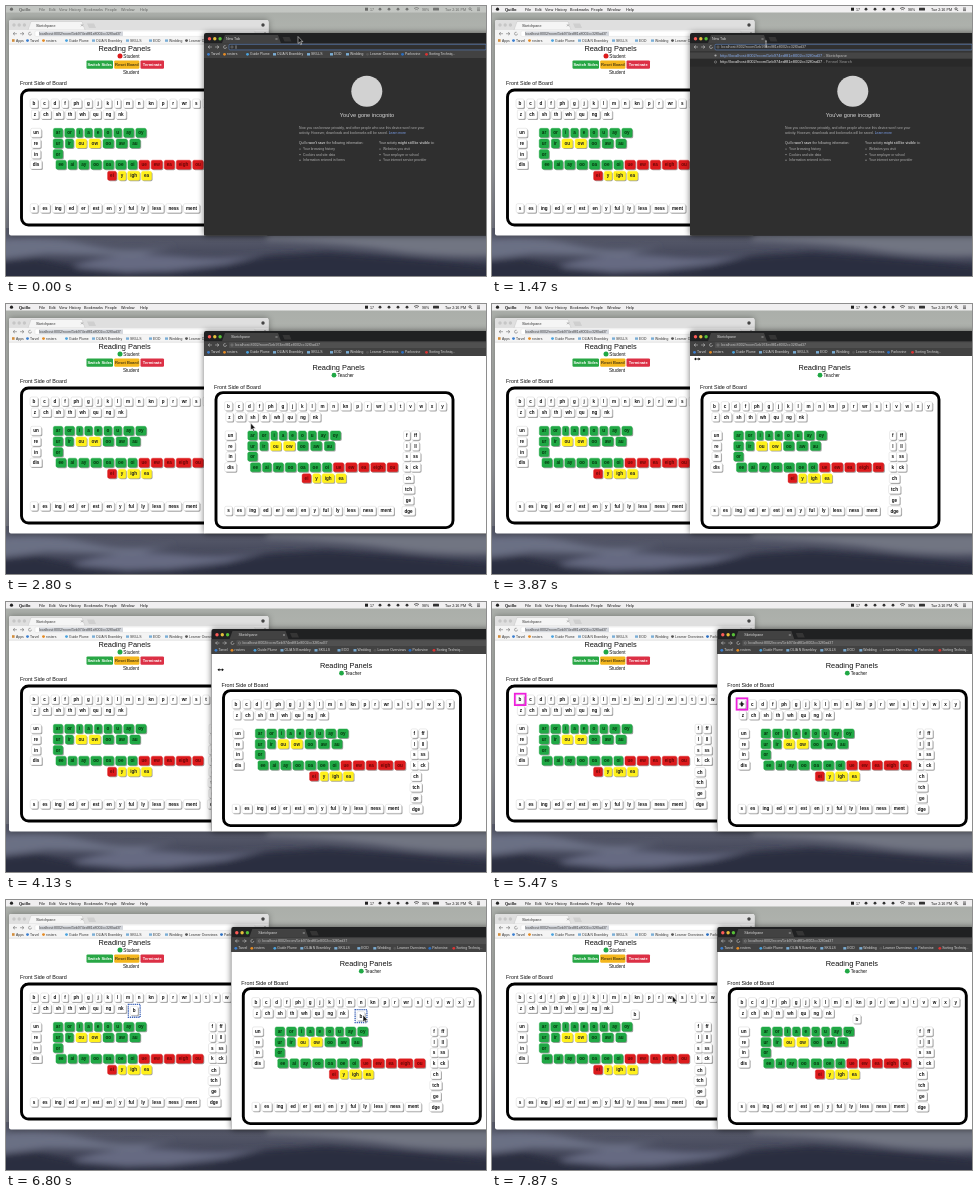
Animation of 480x270 px, one loop 8 s. Source, as an HTML page:

```html
<!DOCTYPE html>
<html lang="en">
<head>
<meta charset="utf-8">
<title>Shared board</title>
<style>
html, body { margin: 0; width: 100%; height: 100%; overflow: hidden; background: #777; }
svg { display: block; width: 100vw; height: 100vh; }
text { font-family: "Liberation Sans", Arial, sans-serif; white-space: pre; }
</style>
</head>
<body>
<svg id="stage" viewBox="0 0 480 270"></svg>
<script>
const LOOP = 8000;
const GREEN = '#20a845', RED = '#dc1a1c', YELLOW = '#fff01a', WHITE = '#fff';
const TITLE = 'Reading Panels', TAB = 'Sketchpane';
const URL_TEXT = 'localhost:8002/room/5eb974edf81e8002cc32f0ad37';
const pen = document.createElement('canvas').getContext('2d');
pen.font = 'bold 100px "Liberation Sans", Arial, sans-serif';
const TILE_FONT = 4.6;
const textWidth = s => pen.measureText(s).width / 100 * TILE_FONT;

// y is the vertical centre of the text
const text = (x, y, s, size, fill = '#111', extra = '') =>
  `<text x="${x}" y="${y + size * 0.35}" font-size="${size}" fill="${fill}" ${extra}>${s}</text>`;
const mid = (x, y, s, size, fill, extra = '') => text(x, y, s, size, fill, 'text-anchor="middle" ' + extra);
const rect = (x, y, w, h, fill, extra = '') =>
  `<rect x="${x}" y="${y}" width="${w}" height="${h}" fill="${fill}" ${extra}/>`;
const dot = (x, y, r, fill, extra = '') => `<circle cx="${x}" cy="${y}" r="${r}" fill="${fill}" ${extra}/>`;
const path = (d, stroke, width = 0.7) =>
  `<path d="${d}" fill="none" stroke="${stroke}" stroke-width="${width}"/>`;
const group = (id, body, extra = '') => `<g id="${id}" ${extra}>${body}</g>`;

function tile(x, y, s, fill = WHITE) {
  const w = textWidth(s) + 5;
  const ink = fill === WHITE ? '#111' : fill === RED ? '#6b0808' : fill === GREEN ? '#06380f' : '#222';
  return rect(x - w / 2 + 1, y - 3.5, w, 9, '#555', 'rx="1.6" opacity=".55"') +
    rect(x - w / 2, y - 4.5, w, 9, fill, `rx="1.5" stroke="${fill === WHITE ? '#ccc' : fill}" stroke-width=".4"`) +
    mid(x, y, s, TILE_FONT, ink, 'font-weight="bold"');
}

// Spreads words between the centres of the first and last tile with equal gaps
function row(words, x0, x1, y, colour = () => WHITE) {
  const list = words.split(' '), widths = list.map(textWidth);
  const last = list.length - 1;
  const used = widths.reduce((a, b) => a + b, 0) - (widths[0] + widths[last]) / 2;
  const gap = last ? (x1 - x0 - used) / last : 0;
  let x = x0;
  return list.map((s, i) => {
    if (i) x += (widths[i - 1] + widths[i]) / 2 + gap;
    return tile(x, y, s, colour(i));
  }).join('');
}

// Tile places are relative to the outer corner of the board
function tiles() {
  const green = () => GREEN;
  let out = row('b c d f ph g j k l m n kn p r wr s t v w x y', 14, 228, 15) +
    row('z ch sh th wh qu ng nk', 15, 101, 26);
  ['un', 're', 'in', 'dis'].forEach((s, i) => out += tile(16, 44.3 + i * 10.6, s));
  out += row('ar or i a e o u ay oy', 38, 121, 44.3, green) +
    row('ur ir ou ow oo aw au', 38, 115, 54.9, i => i === 2 || i === 3 ? YELLOW : GREEN) +
    tile(38, 65.5, 'or', GREEN) +
    row('ee ai ay oo oa oe oi ue ew ea eigh ou', 41, 178, 76.2, i => i < 7 ? GREEN : RED) +
    row('ei y igh ea', 92, 126.5, 87.2, i => i ? YELLOW : RED);
  ['f ff', 'l ll', 's ss', 'k ck'].forEach((pair, i) => {
    const [a, b] = pair.split(' ');
    out += tile(192.3, 44.3 + i * 10.6, a) + tile(201, 44.3 + i * 10.6, b);
  });
  ['ch', 'tch', 'ge', 'dge'].forEach((s, i) => out += tile(194, 87.4 + i * 10.8, s));
  return out + row('s es ing ed er est en y ful ly less ness ment', 14, 171.5, 119.7);
}

const board = (x, y, id) => `<g transform="translate(${x} ${y})">` +
  rect(1.5, 1.5, 237, 135, WHITE, 'rx="7" stroke="#000" stroke-width="2.9"') +
  group(id + 'Tiles', tiles()) +
  group(id + 'Pick', rect(8.8, 9.2, 10.8, 11.4, 'none', 'stroke="#ee20dc" stroke-width="1.8"')) +
  group(id + 'Moved', tile(14, 15, 'b') +
    group(id + 'Dash', rect(8.3, 8.6, 11.8, 12.8, 'none', 'stroke="#3b62b8" stroke-width="1.3" stroke-dasharray="1.3 .8"'))) +
  '</g>';

function bookmarks(x, y, ink) {
  const items = [['Tarvel', 7, '#3c7fd0'], ['rosters', 23, '#e58b24'], ['Guide Plume', 46, '#4aa3df'],
    ['OLIA N Brambley', 73, 0], ['SKILLS', 107, 0], ['EOD', 130, 0], ['Wedding', 146, 0],
    ['Learner Overviews', 166, '#555'], ['Parlorvine', 201, '#2b6fc2'], ['Sorting Techniq...', 225, '#d33']];
  return items.map(([s, dx, c]) =>
    (c ? dot(x + dx - 2.5, y, 1.4, c) : rect(x + dx - 4, y - 1.2, 3, 2.4, '#7baed6')) +
    text(x + dx, y, s, 3.4, ink)).join('');
}

const navIcons = (x, y, c) =>
  path(`M${x + 2} ${y - 1.5}l-2 1.5 2 1.5M${x} ${y}h4M${x + 9} ${y - 1.5}l2 1.5-2 1.5M${x + 11} ${y}h-4`, c, 0.6) +
  `<circle cx="${x + 17}" cy="${y}" r="1.5" fill="none" stroke="${c}" stroke-width=".6" stroke-dasharray="7 2.4"/>`;

function wallpaper() {
  return rect(0, 0, 480, 270, 'url(#sky)') + rect(0, 222, 480, 48, 'url(#slope)') +
    `<g filter="url(#soft)">
     <path d="M260 222H490V250Q430 252 380 244T260 234Z" fill="#717482"/>
     <path d="M-10 234Q40 228 80 238T170 240L130 250 40 248-10 254Z" fill="#6a6f84"/>
     <path d="M60 262Q110 244 170 250T270 246L220 258 140 268Z" fill="#666b82"/>
     <path d="M-10 256L30 252 75 262 120 266 200 264 260 250 320 246 400 252 490 260V280H-10Z" fill="#2b2e40"/>
     </g>`;
}

function menuBar() {
  const items = [['File', 33], ['Edit', 43], ['View', 53], ['History', 63], ['Bookmarks', 78],
    ['People', 99], ['Window', 115], ['Help', 134]];
  return group('menuFill', rect(0, 0, 480, 6.5, '#f0eff0')) + group('editFlash', rect(40.5, 0, 11, 6.5, '#2f6fe4')) +
    group('menuText', dot(5.5, 3.2, 1.6, '#222') + text(13, 3.3, 'Quillo', 4, '#111', 'font-weight="bold"') +
      items.map(([s, x]) => text(x, 3.3, s, 3.8)).join('') +
      '<g transform="translate(-8 0)">' +
      rect(367, 1.7, 3, 3, '#222') + text(372, 3.3, '17', 3.6) +
      [382, 391, 400, 409].map(x => dot(x, 3.2, 1.4, '#333')).join('') +
      path('M416 2.5q2.5-2 5 0M417.3 3.8q1.2-1 2.4 0', '#222') + text(424, 3.3, '98%', 3.5) +
      rect(435, 1.8, 6, 2.8, '#333', 'rx=".5"') + text(447, 3.3, 'Tue 2:16 PM', 3.7) +
      dot(472, 2.8, 1.1, 'none', 'stroke="#222" stroke-width=".6"') + path('M473 3.8l1.2 1.2', '#222') +
      path('M479 2h3M479 3.3h3M479 4.6h3', '#222', 0.6) + '</g>');
}

function leftWindow() {
  const button = (x, w, s, fill, ink) => rect(x, 54.4, w, 8.4, fill, 'rx="1.2"') +
    mid(x + w / 2, 58.7, s, 4, ink, 'font-weight="bold"');
  return rect(3, 14, 259.5, 215.5, '#000', 'rx="2" opacity=".35" filter="url(#shade)"') +
    rect(3, 14, 259.5, 215.5, WHITE, 'rx="2"') +
    '<g clip-path="url(#leftClip)">' + rect(3, 14, 260, 10, '#dfdfdf') +
    [8, 13.2, 18.4].map(x => dot(x, 19, 1.7, '#c6c6c6')).join('') +
    '<path d="M22 24L25 15.5H76L79 24Z" fill="#f5f5f5" stroke="#bbb" stroke-width=".4"/>' +
    text(30, 19.6, TAB, 3.7, '#333') + path('M75 18.3l2 2M77 18.3l-2 2', '#777', 0.5) +
    '<path d="M81 17.5h7l2 4.5h-7Z" fill="#cfcfcf"/>' +
    dot(257, 19, 1.7, '#444') +
    rect(3, 24, 260, 14.2, '#f4f4f4') + navIcons(7, 27.7, '#777') +
    rect(29, 25, 220, 5.4, WHITE, 'rx="1" stroke="#ccc" stroke-width=".3"') +
    rect(33, 25.5, 84, 4.4, '#d3d6dc') + text(33, 27.8, URL_TEXT, 3.55, '#444') +
    path('M259 26v3.4', '#777', 0.8) +
    rect(6, 33.2, 2.6, 2.6, '#d18d3c') + text(10, 34.6, 'Apps', 3.4, '#333') + bookmarks(17, 34.6, '#333') +
    path('M3 38.2h260', '#bbb', 0.4) +
    mid(118.5, 42.3, TITLE, 7.4) +
    dot(114, 50, 2.5, RED, 'id="leftDot"') + text(117.3, 50, 'Student', 4.7) +
    button(80.5, 26.5, 'Switch Sides', '#28a745', WHITE) +
    button(108.2, 25.2, 'Reset Board', '#f4b61d', '#4b3b14') +
    button(134.5, 23.5, 'Terminate', '#dc3045', WHITE) +
    mid(125, 66, 'Student', 4.7) + text(14, 76.8, 'Front Side of Board', 5.4) +
    board(14, 82.5, 'left') + '</g>';
}

function newTabPage() {
  const dim = '#b0b0b0';
  const list = (x, head, lines) => text(x, 137, head, 3.35, '#c4c4c4') +
    lines.map((s, i) => dot(x + 1, 143 + i * 5.6, 0.6, dim) + text(x + 4, 143 + i * 5.6, s, 3.35, dim)).join('');
  return rect(198, 52, 290, 177.5, '#2f2f2f') + dot(360.8, 85.2, 15.5, '#d2d2d2') +
    mid(361, 109.5, 'You\'ve gone incognito', 5.6, '#d8d8d8') +
    text(293, 121.5, 'Now you can browse privately, and other people who use this device won\'t see your', 3.4, dim) +
    text(293, 127, 'activity. However, downloads and bookmarks will be saved. <tspan fill="#7ea2ee">Learn more</tspan>', 3.4, dim) +
    list(293, 'Quillo <tspan font-weight="bold">won\'t save</tspan> the following information:',
      ['Your browsing history', 'Cookies and site data', 'Information entered in forms']) +
    list(373, 'Your activity <tspan font-weight="bold">might still be visible</tspan> to:',
      ['Websites you visit', 'Your employer or school', 'Your internet service provider']);
}

function rightWindow() {
  const full = 'http://' + URL_TEXT;
  return rect(198, 27, 290, 202.5, '#000', 'rx="2" opacity=".55" filter="url(#shade)"') +
    rect(198, 27, 290, 202.5, '#202122', 'rx="2"') +
    [['#fc5b57', 203.5], ['#e5bf3c', 208.8], ['#57c038', 214.1]].map(([c, x]) => dot(x, 32.8, 1.7, c)).join('') +
    '<path d="M216 37.2L219 29H272L275 37.2Z" fill="#424242"/>' +
    group('newName', text(220, 33, 'New Tab', 3.6, '#ddd')) + group('siteName', text(225, 33, TAB, 3.6, '#ddd')) +
    path('M269.5 32l2 2M271.5 32l-2 2', '#aaa', 0.5) +
    '<path d="M276.5 31h7l2 4.5h-7Z" fill="#353535"/>' +
    rect(198, 37.2, 290, 14.8, '#424242') + navIcons(202, 41, '#bbb') +
    rect(223, 38.3, 257, 5.6, '#505050', 'rx="1"') +
    group('focusRing', rect(223, 38.3, 257, 5.6, '#303030', 'rx="1" stroke="#5a83c4" stroke-width=".6"')) +
    dot(226, 41, 1.1, 'none', 'stroke="#999" stroke-width=".5"') +
    group('caret', path('M230 39.4v3.4', '#eee', 0.5)) +
    group('address', text(229, 41.1, URL_TEXT, 3.7, '#c4c4c4')) +
    bookmarks(198, 48.3, '#dadada') +
    newTabPage() +
    group('hints', rect(198, 45.5, 290, 15, '#292929') + rect(198, 46.3, 290, 6.4, '#454545') +
      dot(223.5, 49.5, 1.1, '#aaa') + text(228, 49.5, `<tspan fill="#88aef2">${full}</tspan> - ${TAB}`, 4, '#bbb') +
      dot(223.5, 56, 1.1, 'none', 'stroke="#aaa" stroke-width=".5"') +
      text(228, 56, `${full}<tspan fill="#999"> - Fennel Search</tspan>`, 4, '#f0f0f0')) +
    group('site', rect(198, 52, 290, 177.5, WHITE) + mid(332.5, 63, TITLE, 7.4) +
      group('rightDot', dot(328, 71.2, 2.4, GREEN)) + text(331.5, 71.2, 'Teacher', 4.6) +
      text(208, 82.9, 'Front Side of Board', 5.4) + board(208.5, 87.1, 'right'));
}

const cursor = group('arrow', '<path d="M0 0V7L1.6 5.6 2.7 8.1 3.8 7.6 2.7 5.2H4.9Z" fill="#111" stroke="#fff" stroke-width=".5"/>') +
  group('beam', path('M-1 -3h2M0 -3v6M-1 3h2', '#ddd', 0.6)) +
  group('resize', path('M0 0h4.5', '#111', 0.9) + '<path d="M-1 0l2-1.4v2.8ZM5.5 0l-2-1.4v2.8Z" fill="#111"/>') +
  group('move', path('M-2.4 0h4.8M0 -2.4v4.8', '#111', 1.1));

const stage = document.getElementById('stage');
stage.innerHTML = `<defs>
  <linearGradient id="sky" x1="0" y1="0" x2="0" y2="1">
    <stop offset="0" stop-color="#a9ada8"/><stop offset=".12" stop-color="#b0b3ae"/>
    <stop offset=".6" stop-color="#9b9da0"/><stop offset="1" stop-color="#5c5f70"/>
  </linearGradient>
  <linearGradient id="slope" x1="0" y1="0" x2="0" y2="1">
    <stop offset="0" stop-color="#5f6272"/><stop offset="1" stop-color="#33364a"/>
  </linearGradient>
  <filter id="soft"><feGaussianBlur stdDeviation="3"/></filter>
  <filter id="shade"><feGaussianBlur stdDeviation="3"/></filter>
  <clipPath id="leftClip"><rect x="3" y="14" width="259.5" height="215.5" rx="2"/></clipPath>
  </defs>` + wallpaper() + menuBar() + leftWindow() + group('rightWin', rightWindow()) + group('cursor', cursor);

const el = {};
stage.querySelectorAll('[id]').forEach(n => el[n.id] = n);
const show = (id, on) => el[id].setAttribute('display', on ? 'inline' : 'none');
const place = (id, x, y) => el[id].setAttribute('transform', `translate(${x} ${y})`);

// Linear path through [time, x, y] points
function along(points, t) {
  let a = points[0];
  for (const b of points) {
    if (t < b[0]) {
      const k = Math.max(0, (t - a[0]) / (b[0] - a[0] || 1));
      return [a[1] + (b[1] - a[1]) * k, a[2] + (b[2] - a[2]) * k];
    }
    a = b;
  }
  return [a[1], a[2]];
}
const ease = k => { k = Math.min(1, Math.max(0, k)); return k * k * (3 - 2 * k); };

const POINTER = [[0, 292, 30.5], [70, 292, 30.5], [530, 274, 38], [2330, 274, 38], [2530, 255, 135],
  [2670, 255, 135], [3330, 203, 55], [3900, 203, 55], [4570, 230.3, 92], [5000, 230.3, 92], [5400, 249.8, 102],
  [5930, 249.8, 102], [6800, 357, 115], [7130, 367, 119], [7270, 367, 119], [7870, 180.5, 96]];
const DRAG = [[5930, 0, 0], [6800, 105, 14], [7130, 115, 17]];
const LAG = 42;

function draw(t) {
  const loaded = t >= 1700, filled = t >= 2400, typed = t >= 870;
  el.menuFill.setAttribute('opacity', 0.35 + 0.65 * ease((t - 70) / 460));
  el.menuText.setAttribute('opacity', 0.55 + 0.45 * ease((t - 70) / 460));
  show('editFlash', typed && t < 1000);
  show('newName', !loaded);
  show('siteName', loaded);
  show('focusRing', t < 1600);
  show('caret', !typed);
  show('address', typed);
  show('hints', typed && t < 1600);
  show('site', loaded);
  show('rightDot', filled);
  show('rightTiles', filled);
  el.leftDot.setAttribute('fill', filled ? GREEN : RED);
  place('rightWin', 27.3 * ease((t - 3900) / 670), 0);

  for (const [side, lag] of [['left', LAG], ['right', 0]]) {
    const s = t - lag;
    show(side + 'Pick', s >= 5330 && s < 5930);
    show(side + 'Moved', s >= 5930);
    show(side + 'Dash', s < 7130);
    place(side + 'Moved', ...along(DRAG, s));
  }

  place('cursor', ...along(POINTER, t));
  const kind = t < 500 ? 'arrow' : t < 1600 ? 'beam' : t < 2330 ? '' : t < 3300 ? 'arrow' :
    t < 5000 ? 'resize' : t < 5330 ? 'arrow' : t < 5930 ? 'move' : 'arrow';
  for (const k of ['arrow', 'beam', 'resize', 'move']) show(k, k === kind);
}

const start = performance.now();
function tick() {
  draw((performance.now() - start) % LOOP);
  requestAnimationFrame(tick);
}
draw(0);
requestAnimationFrame(tick);
</script>
</body>
</html>
```
